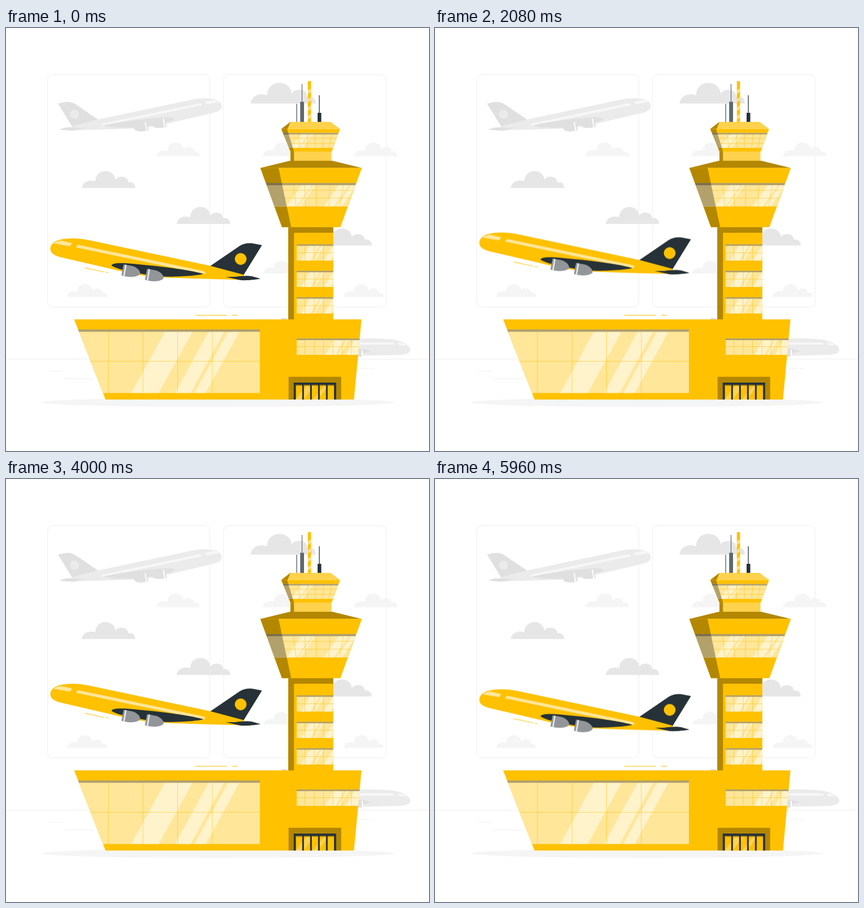
Animation, 748 px wide and 748 px high, one loop 6 s. Source, as an HTML page:

```html
<!DOCTYPE html>
<html lang="en">
<head>
<meta charset="utf-8">
<title>Airport</title>
<style>
html, body { margin: 0; width: 100%; height: 100%; overflow: hidden; background: #fff; }
svg { display: block; width: 100%; height: 100%; }
.main { fill: #ffc100; }
.shade { fill: #b38700; }
.light { fill: #ffd24d; }
.glass { fill: #ffe699; }
.shine { fill: #fff3cc; }
.strip { fill: #b3a16b; }
.dark { fill: #263238; }
.grid { fill: none; stroke: #ffc100; stroke-width: .8; stroke-opacity: .7; }
.cloud { fill: #e6e6e6; }
.pale { fill: #f5f5f5; }
.hair { fill: none; stroke: #efefef; stroke-width: 1; }
.trail { fill: none; stroke: #ffd24d; stroke-width: 1.3; }
.body { fill: var(--body); }
.fin { fill: var(--fin); }
.pane { fill: var(--pane); }
.jet { fill: var(--jet); }
.ring { fill: var(--ring); }
.yellow { --body: #ffc100; --fin: #263238; --pane: #ffe699; --jet: #929699; --ring: #e9eaeb; }
.gray { --body: #ebebeb; --fin: #e0e0e0; --pane: #f7f7f7; --jet: #e0e0e0; --ring: #fff; }
.float { animation: float 6s linear infinite; }
@keyframes float {
  50% { transform: translateY(-14.96px); }
}
</style>
</head>
<body>
<svg viewBox="0 0 748 748">
  <defs>
    <path id="cloud" d="M0 30C1 19 13 14 24 18C24 7 32 0 42 0S59 7 59.5 15.5C62 11 67 10 71 10C78 10 82 14 82 20C89 18 95 23 94.5 30Z"/>

    <g id="jet">
      <path class="jet" d="M208 418L224 421C233 424 238 430 237 435C233 440.5 218 442 204 437.5Z"/>
      <path class="ring" d="M210.7 418.5L213.2 419L209.8 439.3L207.3 438.6Z"/>
    </g>

    <g id="plane">
      <path class="fin" d="M361 421L413 385.5C420 381 428 379.8 437 381L452.7 384L420 437Z"/>
      <circle class="body" cx="415" cy="408.5" r="10.4"/>
      <path class="body" d="M78.4 391C78 383 85 376.5 97 374C112 371.2 128 371.3 146 375L361 420.5L421 436.5C420 441 418 445 412 445.2L330 443L262 440.5C235 437 215 433 190 427L104 407C89 404 79 400 78.4 391Z"/>
      <path class="pane" d="M84 381C88 377.5 94 376 98 376L117 380.5L113.5 386Z"/>
      <path class="pane" d="M127 383.3L346 429Q354 431 352.5 433.5Q351 435.4 345 434.3L123.5 388Z"/>
      <path class="fin" d="M186.5 420C188 415 205 415 230 417.5C270 421 322 427 349 434.8C340 438 300 440.5 280 439.5C245 437 200 429 186.5 420Z"/>
      <use href="#jet"/>
      <use href="#jet" x="41.5" y="7.8"/>
      <path class="fin" d="M388.5 440L405 440C415 438.5 427 437.5 435 439L450 443.3C440 445.5 425 446.5 415 446Z"/>
    </g>

    <g id="window">
      <path class="glass" d="M514 383H578.7V411.3H514Z"/>
      <path class="shine" d="M538 383H555L539 411.3H522ZM559 383H563L547 411.3H543ZM578.7 384V405L575 411.3H562Z"/>
      <path class="grid" d="M514 397.5H578.7M528.5 383V411.3M545 383V411.3M561.5 383V411.3"/>
      <path class="strip" d="M514 382.5H578.7V385.3H514Z"/>
    </g>

    <clipPath id="hall"><path d="M127.5 533H449V645.5H171.5Z"/></clipPath>
    <clipPath id="deck"><path d="M459.8 274H619.2L604.2 315.5H474.8Z"/></clipPath>
    <clipPath id="cab"><path d="M489.7 185.5H588L578.2 212H500.5Z"/></clipPath>
    <clipPath id="lobby"><path d="M514 549H625.3L622.7 578H514Z"/></clipPath>
    <clipPath id="mast"><path d="M533.8 94H539.4V166H533.8Z"/></clipPath>
  </defs>

  <!-- Backdrop -->
  <rect class="hair" x="73.5" y="82.5" width="287" height="411" rx="9"/>
  <rect class="hair" x="384.7" y="82.5" width="287.6" height="411" rx="9"/>
  <path class="hair" d="M0 585.5H748M77 607H101M104 620.5H155M626 602H641M645 602H652"/>

  <g class="cloud">
    <use href="#cloud" x="134" y="253"/>
    <use href="#cloud" x="301.8" y="316.5"/>
    <use href="#cloud" x="552.2" y="354.5"/>
    <use href="#cloud" transform="translate(432.5 97) scale(1.22)"/>
  </g>
  <g class="pale">
    <use href="#cloud" transform="translate(266 202.5) scale(.81)"/>
    <use href="#cloud" transform="translate(454 202.5) scale(.81)"/>
    <use href="#cloud" transform="translate(615.5 202.5) scale(.81)"/>
    <use href="#cloud" transform="translate(108 453) scale(.75)"/>
    <use href="#cloud" transform="translate(597 453) scale(.75)"/>
    <use href="#cloud" transform="translate(455 411.5) scale(.75)"/>
  </g>

  <use class="gray" href="#plane" transform="translate(442.3 -163.8) scale(-.774 .774)"/>

  <!-- Parked plane -->
  <g class="gray">
    <path class="fin" d="M486 513H496L500 517H489Z"/>
    <path class="body" d="M600 549H640C665 549 684 550 694 553C704 556 715 562 715 569C715 576 704 578 690 578.3L600 580Z"/>
    <path class="pane" d="M600 556H682Q688 556.5 688 560H600ZM693 556L703 557.5L709 561H695Z"/>
    <path class="fin" d="M600 566C620 566 638 568 645 571C640 575 620 577 600 577Z"/>
    <path class="jet" d="M614 569H630V581H614Z"/>
    <path class="ring" d="M629 569H631V581H629Z"/>
  </g>

  <ellipse class="pale" cx="375.5" cy="662" rx="312" ry="8"/>

  <!-- Antennas -->
  <path fill="#5f686d" d="M513.4 134H514.8V166H513.4ZM522.9 99H524.1V131H522.9ZM520.2 130.5H527V166H520.2Z"/>
  <path class="dark" d="M553.4 119H554.7V151H553.4ZM551 150H557.5V166H551Z"/>
  <path class="main" d="M533.8 94H539.4V166H533.8Z"/>
  <path clip-path="url(#mast)" stroke="#ffe08a" stroke-width="5" d="M532 115L542 108M532 130L542 123M532 145L542 138M532 160L542 153"/>

  <!-- Upper cab -->
  <path class="light" d="M503 217H575.5V236H503Z"/>
  <path class="shade" d="M503 217H509.3V236H503Z"/>
  <path class="light" d="M486.8 178.5L503 166H574L590.7 178.5Z"/>
  <path class="shade" d="M486.8 178.5L503 166L498 178.5Z"/>
  <path class="main" d="M486.8 178.5H590.7L576 218.5H503Z"/>
  <path class="shade" d="M486.8 178.5H497L509.3 218.5H503Z"/>
  <g clip-path="url(#cab)">
    <path class="glass" d="M480 185H600V212H480Z"/>
    <path class="shine" d="M524 185H538L517 212H503ZM541 185H545L524 212H520Z"/>
    <path class="grid" d="M486 195H592M486 204H592M517 185L519 212M533 185V212M547 185V212M562 185L560 212M576 185L571 212"/>
    <path class="strip" d="M480 185H600V188.3H480ZM480 185H499L507.3 212H480Z"/>
    <path fill="#7d714b" d="M480 185H499L500 188.3H480Z"/>
  </g>

  <!-- Control deck -->
  <path class="shade" d="M449.7 247.5L502 234.7H577L629.3 247.5Z"/>
  <path class="main" d="M449.7 247.3H629.3L591.3 352.3H488Z"/>
  <path class="shade" d="M449.7 247.3H482L504.3 352.3H488Z"/>
  <g clip-path="url(#deck)">
    <path class="glass" d="M450 274H630V316H450Z"/>
    <path class="shine" d="M525 274H543L514 315.5H496ZM546 274H550L521 315.5H517ZM591 274H609L580 315.5H562ZM613 274H623L594 315.5H584Z"/>
    <path class="grid" d="M455 287H625M455 301H625M508 274L513 316M528 274L530 316M549 274V316M573 274L571 316M597 274L590 316"/>
    <path class="strip" d="M450 274H630V278H450ZM450 274H487.7L496.5 316H450Z"/>
    <path fill="#7d714b" d="M450 274H487.7L488.5 278H450Z"/>
  </g>

  <!-- Shaft -->
  <path class="main" d="M499.2 352.3H578.8V516H499.2Z"/>
  <path class="shade" d="M499.2 352.3H578.8V362H509.3V516H499.2Z"/>
  <use href="#window"/>
  <use href="#window" y="46.7"/>
  <use href="#window" y="93.4"/>

  <!-- Terminal -->
  <path class="main" d="M120.5 515.3H628.6L615.3 657H176Z"/>
  <g clip-path="url(#hall)">
    <path class="glass" d="M120 533H449V646H120Z"/>
    <path class="shine" d="M283 533H332L270 645.5H221.5ZM360.5 533H388L326.5 645.5H299ZM395 533H415L353 645.5H333Z"/>
    <path class="grid" d="M120 589.3H449M181 533V646M242.3 533V646M303.5 533V646M364.8 533V646M422.5 533V537"/>
    <path class="strip" d="M120 533H449V537.2H120Z"/>
  </g>
  <g clip-path="url(#lobby)">
    <path class="glass" d="M514 549H626V578H514Z"/>
    <path class="shine" d="M581 549H599L583 578H565ZM603 549H607L591 578H587ZM617 549H626V578H601Z"/>
    <path class="grid" d="M514 563.5H626M528.5 549V578M545 549V578M561.5 549V578M578 549V578M594.5 549V578M611 549V578"/>
    <path class="strip" d="M514 549H626V552H514Z"/>
  </g>

  <!-- Entrance -->
  <path class="shade" d="M499.7 616.8H592.7V657H499.7Z"/>
  <path class="dark" d="M508.8 627H583.8V657H508.8Z"/>
  <path class="main" d="M512.6 631H580V657H512.6Z"/>
  <path class="light" d="M531 633H545L526 657H512.6V656ZM562 633H570L551 657H543Z"/>
  <path class="shade" d="M512.6 631H580V633H512.6Z"/>
  <path stroke="#263238" stroke-width="3" d="M525.3 630V657M539.3 630V657M553.3 630V657M567.3 630V657"/>

  <path class="trail" d="M335 508H391M400 508H410"/>

  <!-- Departing plane -->
  <g class="float yellow">
    <path class="trail" d="M139 424L173.5 431.3M176 431.7L181 432.8"/>
    <use href="#plane"/>
  </g>
</svg>
</body>
</html>
```
